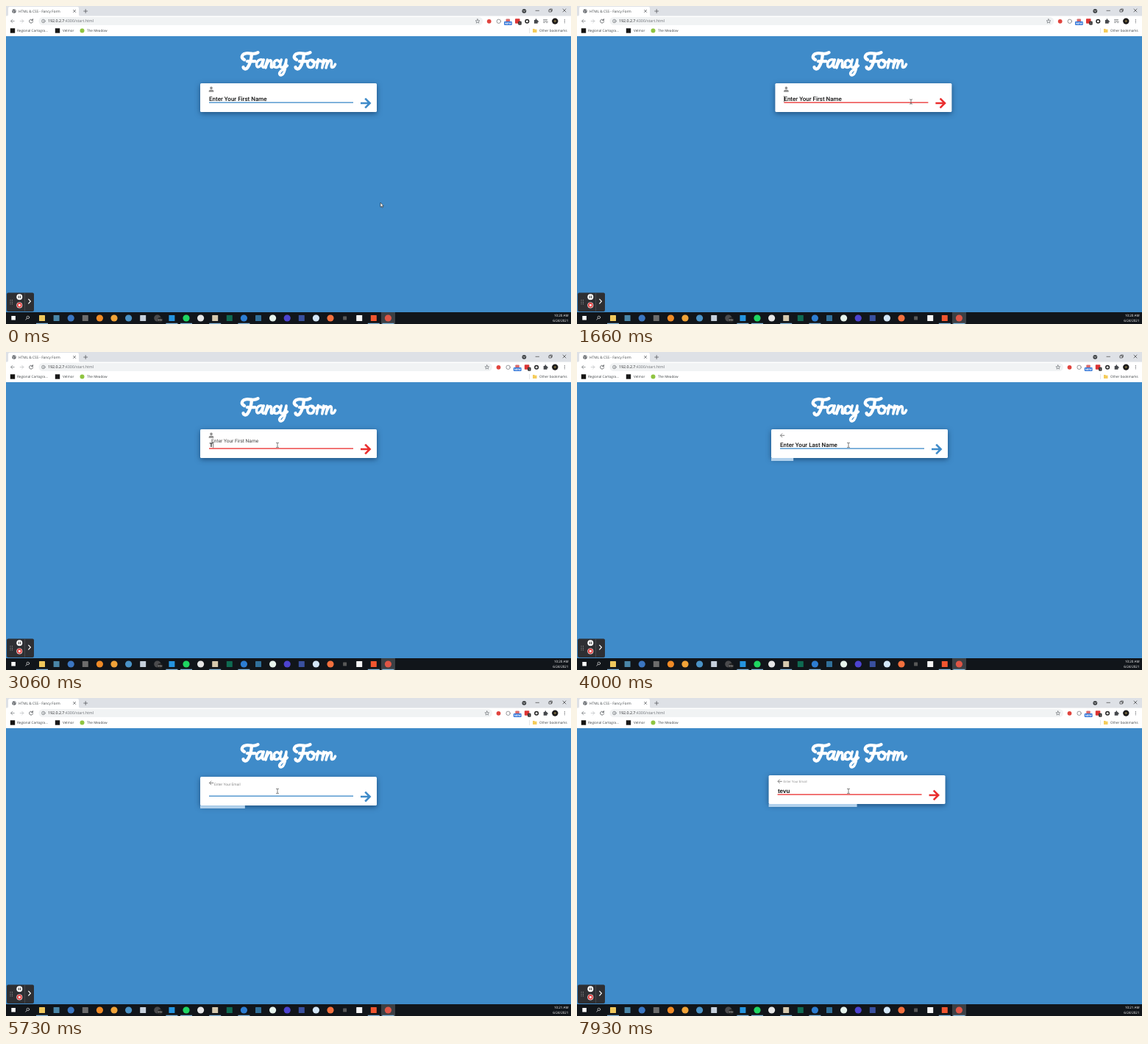
Animation, 768 px wide and 432 px high, one loop 8000 ms. Source, as an HTML page:

```html
<!DOCTYPE html>
<html lang="en">
<head>
<meta charset="utf-8">
<title>Fancy Form</title>
<style>
  html, body { margin: 0; width: 100%; height: 100%; overflow: hidden; background: #3f8bc9; }
  svg { display: block; width: 768px; height: 432px; }
  text { font-family: "Open Sans", sans-serif; text-rendering: geometricPrecision; white-space: pre; }
  #label { font-family: Roboto, sans-serif; }
  #value { font: bold 8px "Liberation Sans", sans-serif; fill: #111; }
  #card { filter: drop-shadow(0 2.4px 3.5px rgba(0, 20, 50, .5)); }
  .line { fill: none; stroke-linecap: round; stroke-linejoin: round; }
  .ui { font-size: 4.6px; fill: #3c4043; }
  .clock { font-size: 4.5px; fill: #fff; text-anchor: end; }
</style>
</head>
<body>
<svg viewBox="0 0 768 432">
  <rect width="768" height="432" fill="#3f8bc9"/>

  <g id="tabs">
    <rect width="768" height="14" fill="#dee1e6"/>
    <path d="M1 14Q3 14 3 11V3Q3 1 5 1H97Q99 1 99 3V11Q99 14 101 14Z" fill="#fff"/>
    <circle cx="11" cy="7" r="2.7" fill="#5f6368"/>
    <path d="M9 6.2L11 7L10.4 8.8M11.8 5L12.8 7" class="line" stroke="#fff" stroke-width=".6"/>
    <text x="17" y="8.7" font-size="4.78" fill="#3c4043">HTML &amp; CSS - Fancy Form</text>
    <path d="M91.5 5.3L94.7 8.5M94.7 5.3L91.5 8.5M105.7 7H110.7M108.2 4.5V9.5" class="line" stroke="#4a4d51" stroke-width=".7"/>
    <circle cx="704.3" cy="6.8" r="2.9" fill="#3c4043"/>
    <path d="M703 6.2L704.3 7.6L705.6 6.2" class="line" stroke="#fff" stroke-width=".7"/>
    <path d="M720 6.3H724.5M738.3 5H741.3V8H738.3ZM739.3 5V4H742.3V7H741.3M757 4L761 8M761 4L757 8" class="line" stroke="#222" stroke-width=".6"/>
  </g>

  <g id="toolbar">
    <rect y="13.5" width="768" height="27.5" fill="#fff"/>
    <path d="M11.2 20.5H6.5M8.8 18.2L6.5 20.5L8.8 22.8" class="line" stroke="#85888c" stroke-width=".8"/>
    <path d="M19.2 20.5H23.9M21.6 18.2L23.9 20.5L21.6 22.8" class="line" stroke="#c2c4c7" stroke-width=".8"/>
    <path d="M36.2 19.2A2.5 2.5 0 1 0 36.6 21.2M36.5 17.6V19.6H34.5" class="line" stroke="#505357" stroke-width=".8"/>
    <rect id="pill" x="44.5" y="15" height="11" rx="5.5" fill="#f1f3f4"/>
    <circle cx="50.8" cy="20.5" r="2.3" class="line" stroke="#5f6368" stroke-width=".6"/>
    <path d="M50.8 20.3V21.7M50.8 19.2V19.3" class="line" stroke="#5f6368" stroke-width=".6"/>
    <text x="57" y="22.4" font-size="5.3" fill="#202124">192.0.2.7<tspan fill="#6a6e73">:4300/start.html</tspan></text>
    <g id="extras">
      <path d="M641 17.8L641.8 19.8L643.9 19.9L642.3 21.2L642.8 23.2L641 22.1L639.2 23.2L639.7 21.2L638.1 19.9L640.2 19.8Z" class="line" stroke="#5f6368" stroke-width=".6"/>
      <circle cx="656.7" cy="20.8" r="2.9" fill="#e0443e"/>
      <circle cx="669.8" cy="20.8" r="2.7" class="line" stroke="#7a7d81" stroke-width=".8"/>
      <rect x="679.5" y="17.5" width="5.5" height="4" rx="1" fill="#d96a6a"/>
      <rect x="677" y="21" width="10.8" height="5" rx="1" fill="#2f74d8"/>
      <text x="682.4" y="25.1" font-size="3.8" font-weight="700" fill="#fff" text-anchor="middle">NEW</text>
      <rect x="692" y="17.3" width="6.5" height="6.5" rx=".8" fill="#dc3434"/>
      <rect x="696.3" y="20.8" width="4.4" height="5" rx="1" fill="#333"/>
      <text x="698.5" y="24.9" font-size="3.8" fill="#fff" text-anchor="middle">1</text>
      <circle cx="708.3" cy="20.8" r="2.3" class="line" stroke="#222" stroke-width="1.5"/>
      <path d="M717.9 19H719.6Q719.3 17.3 720.5 17.3Q721.7 17.3 721.4 19H722.7V20.4Q724 20.2 724 21.2Q724 22.2 722.7 22V23.8H717.9Z" fill="#45484c"/>
    </g>
    <path id="list" d="M730.5 18.5H735.5M730.5 20.5H735.5M730.5 22.5H732.5M734 22L735.2 23L736.2 21.5" class="line" stroke="#5f6368" stroke-width=".7"/>
    <circle cx="746.3" cy="20.6" r="4.2" fill="#1d1b1a"/>
    <circle cx="746.3" cy="20.6" r="1.5" fill="#75663c"/>
    <path d="M759.3 18.5V18.6M759.3 20.6V20.7M759.3 22.7V22.8" class="line" stroke="#45484c" stroke-width="1.1"/>
    <rect x="5.8" y="30.3" width="6.4" height="6.4" fill="#151412"/>
    <text class="ui" x="15" y="35.2">Regional Cartogra...</text>
    <rect x="66.8" y="30.3" width="6.4" height="6.4" fill="#191919"/>
    <text class="ui" x="77" y="35.2">Velmor</text>
    <circle cx="103.5" cy="33.5" r="3" fill="#8fc440"/>
    <text class="ui" x="110" y="35.2">The Meadow</text>
    <path d="M711.5 30V37" stroke="#d4d6d9" stroke-width=".6"/>
    <path d="M716 31H718.3L719 31.8H721.5V36H716Z" fill="#f5cc5b"/>
    <text class="ui" x="725" y="35.2">Other bookmarks</text>
  </g>

  <g id="title" class="line" stroke="#fff" stroke-width="3.5" role="img" aria-label="Fancy Form">
    <g id="capital" stroke-width="4.3">
      <path d="M324 73C318 70 321 64.5 328 64.2C334 64 337 66.5 342.5 63.2"/>
      <path d="M334 65C333.5 72 331.5 79 328.5 83.5C326.5 86.5 323 86 322.5 83"/>
      <path d="M328 75.2H338.5"/>
    </g>
    <use href="#capital" x="71"/>
    <path d="M349 73.5C345 71 340.5 75 340.5 79.5C340.5 85 346 84 349 75"/>
    <path d="M350.3 73C348 79 348 83.6 350 83.6C352 83.6 353.5 80 354.5 76"/>
    <path d="M355.3 73L353 84C354 79 357 73 360 74C362.5 75 358.5 83.5 361.3 83.5C363 83.5 364 81 365 79"/>
    <path d="M371 75.5C370 72 364 73.5 364 79C364 85 369.5 84.5 372.5 80"/>
    <path d="M374.3 73C372 79 372 83.5 375 83.5C378 83.5 380 78 381 73C380.5 82 379.5 89 376.5 92.5C373 96 369.5 92.5 373.5 88.5C376.5 85.5 380 84 382.5 81"/>
    <path d="M415.5 73.3C411 73 409 77 410 80.5C411.3 85 418 84.5 418.7 79C419 75.5 418 73.3 415.5 73.3C416 77 421 77.5 423.5 75"/>
    <path d="M424.3 72.5L422.3 84M423 79.5C424.7 74 427 73 428.6 75.5"/>
    <path d="M431.7 73L429.7 84C430.7 79 433 73 435.7 74C437.7 75 436 80 435 84C436 79 439 73 441.7 74C444 75 440.5 83.5 443.5 83.5C446 83.5 446.8 81 447.6 79"/>
  </g>

  <g id="form">
    <rect id="card" x="264" y="105" width="240" height="39" rx="1.6" fill="#fff"/>
    <rect id="bar" x="264" y="144" height="4" fill="#b1d1ec"/>
    <path id="person" d="M279 109.4A1.8 1.9 0 0 1 279 113.2A1.8 1.9 0 0 1 279 109.4M275.7 116.7V115.6Q275.7 113.7 278 113.7H280Q282.3 113.7 282.3 115.6V116.7Z" fill="#8d8d8d"/>
    <path id="back" d="M282.2 113.3H276.5M279.1 110.6L276.4 113.3L279.1 116" class="line" stroke="#777" stroke-width=".9" style="stroke-linecap:butt"/>
    <text id="value" y="128.6"></text>
    <text id="label"></text>
    <rect id="caret" y="122" width=".6" height="8.4" fill="#222"/>
    <rect id="under" x="276" y="130.5" width="196" height="1.3"/>
    <path id="next" d="M482 132H494.5M488.2 125.6L494.6 132L488.2 138.4" fill="none" stroke-width="2.6"/>
  </g>

  <g id="recorder">
    <rect x="1" y="389.5" width="37" height="25.5" rx="2" fill="#2e2f33"/>
    <path d="M6 399.7V399.8M8.5 399.7V399.8M6 402.2V402.3M8.5 402.2V402.3M6 404.7V404.8M8.5 404.7V404.8" class="line" stroke="#bbb" stroke-width="1.1"/>
    <circle cx="18.3" cy="395.3" r="4" fill="#fff"/>
    <path d="M17.2 393.6V397M19.4 393.6V397" stroke="#333"/>
    <circle cx="18.3" cy="406.4" r="4" fill="#f3e9e9"/>
    <circle cx="18.3" cy="406.4" r="3.3" fill="#e23b3b"/>
    <rect x="16.9" y="405" width="2.8" height="2.8" fill="#fff"/>
    <path d="M25.5 390V414.5" stroke="#55565a" stroke-width=".6"/>
    <path d="M30.7 398.3L33.4 401.2L30.7 404.1" class="line" stroke="#fff" stroke-width="1.2"/>
  </g>

  <rect y="416" width="768" height="16" fill="#11151a"/>
  <g id="tasks"></g>
  <text class="clock" id="clock" x="764.5" y="422"></text>
  <text class="clock" x="764.5" y="429.3">6/24/2021</text>

  <path id="arrow" d="M0 0V6.2L1.4 5L2.3 7L3.3 6.6L2.4 4.6H4.2Z" fill="#fff" stroke="#222" stroke-width=".6"/>
  <path id="beam" d="M-1.5 -3.2Q0 -3.2 0 -2.5Q0 -3.2 1.5 -3.2M0 -2.5V2.5M-1.5 3.2Q0 3.2 0 2.5Q0 3.2 1.5 3.2" class="line" stroke="#444" stroke-width=".7"/>
</svg>

<script>
const LOOP = 8000, BLUE = '#3f8bc9', RED = '#ea2e2e';
const CUT = 2400, FOCUS = 1360, MINUTE = 5200;
const SHAKES = [1233, 7594], STEP = 100;

const questions = [
  { at: 0, label: 'Enter Your First Name', value: 'Tevu', keys: [2974, 3090, 3200, 3300] },
  { at: 3700, label: 'Enter Your Last Name', value: 'Veltrin', keys: [4400, 4530, 4660, 4790, 4920, 5260, 5430] },
  { at: 5680, label: 'Enter Your Email', value: 'tevu', keys: [7040, 7130, 7220, 7310] }
];
// time, x, y
const mousePath = [[0, 509, 267], [60, 509, 267], [950, 490, 131], [1300, 489, 131], [1660, 454, 130], [2400, 369, 126.5]];

const $ = id => document.getElementById(id);
const set = (id, attrs) => { for (const k in attrs) $(id).setAttribute(k, attrs[k]); };
const show = (id, on) => set(id, { visibility: on ? 'visible' : 'hidden' });
const mix = (a, b, k) => a + (b - a) * k;

// cubic-bezier(.42, 0, .58, 1)
function ease(p) {
  if (p <= 0) return 0;
  if (p >= 1) return 1;
  let lo = 0, hi = 1;
  for (let i = 0; i < 20; i++) {
    const u = (lo + hi) / 2, v = 1 - u;
    if (3 * v * v * u * .42 + 3 * v * u * u * .58 + u * u * u < p) lo = u; else hi = u;
  }
  return lo * lo * (3 - 2 * lo);
}
const ramp = (t, from, ms) => ease((t - from) / ms);

function shake(t) {
  let x = 0;
  for (const start of SHAKES)
    for (let i = 0; i <= 6; i++) {
      const target = i < 6 ? (i % 2 * 2 - 1) * 8 : 0;
      x = mix(x, target, ramp(t, start + i * STEP, STEP));
    }
  return x;
}

function mouse(t) {
  let i = 1;
  while (i < mousePath.length - 1 && t > mousePath[i][0]) i++;
  const [t0, x0, y0] = mousePath[i - 1], [t1, x1, y1] = mousePath[i];
  const k = ramp(t, t0, t1 - t0);
  return [mix(x0, x1, k), mix(y0, y1, k)];
}

function buildTasks() {
  const icons = ('s#efc75c s#4a86a8 c#3b76c2 s#6c6c6c c#ef8a26 c#f0a338 c#4a92c6 s#c6d0dc c#4b4b4d s#2594df c#1fd662 c#e6e6e6 ' +
    's#d6c9ae s#0f6b52 c#2d7dd2 s#31709a c#e6f3ec c#4d43d0 s#39509f c#d3e6f7 c#f2703e s#585858 s#f4f4f4 s#f0552f c#de5546').split(' ');
  const open = [0, 9, 10, 12, 14, 23, 24];
  let out = '<rect x="7.3" y="421" width="5.6" height="5.6" fill="#fff"/>' +
    '<circle cx="29.8" cy="423" r="1.8" class="line" stroke="#ddd" stroke-width=".7"/>' +
    '<path d="M28.4 424.4L26.8 426.2" class="line" stroke="#ddd" stroke-width=".8"/>' +
    '<rect x="510" y="416" width="19" height="16" fill="#3c4045"/>';
  icons.forEach((icon, i) => {
    const x = 49 + i * 19.6, fill = icon.slice(1);
    const r = i === 21 ? 2.5 : 4;
    out += icon[0] === 'c'
      ? `<circle cx="${x}" cy="424" r="4.6" fill="${fill}"/>`
      : `<rect x="${x - r}" y="${424 - r}" width="${2 * r}" height="${2 * r}" rx=".6" fill="${fill}"/>`;
    if (open.includes(i)) out += `<rect x="${x - 8}" y="430.8" width="16" height="1.2" fill="#86b8dd"/>`;
  });
  out += '<circle cx="209.5" cy="426.6" r="3.6" fill="#222"/>' +
    '<text x="209.5" y="428.2" font-size="3.8" fill="#fff" text-anchor="middle">99+</text>';
  $('tasks').innerHTML = out;
}

function draw(t) {
  const n = questions.filter(q => t >= q.at).length - 1;
  const q = questions[n];
  const typed = q.value.slice(0, q.keys.filter(k => t >= k).length);
  const failed = SHAKES.some(s => t >= s && s >= q.at);

  let drop = 0, progress = 0, small = 0;
  questions.forEach((item, i) => {
    if (i) {
      drop += 4 * (ramp(t, item.at, STEP) - ramp(t, item.at + STEP, STEP));
      progress += 60 * ramp(t, item.at, 600);
      small -= ramp(t, item.at, 200);
    }
    small += ramp(t, item.keys[0], 200);
  });

  set('form', { transform: `translate(${shake(t)} ${drop})` });
  set('bar', { width: progress });
  show('person', n === 0);
  show('back', n > 0);

  const grey = Math.round(mix(17, 150, small));
  $('label').textContent = q.label;
  set('label', {
    x: 276 + 8 * small, y: 128.9 - 14.3 * small,
    'font-size': 8 - 3.6 * small,
    'font-weight': small < .3 ? 500 : 400,
    fill: `rgb(${grey},${grey},${grey})`
  });
  $('value').textContent = typed;
  set('value', { x: 276.4 });
  set('under', { fill: failed ? RED : BLUE });
  set('next', { stroke: failed ? RED : BLUE });

  const blink = Math.floor((t - FOCUS) / 500) % 2 === 0;
  show('caret', n === 0 && t >= FOCUS && (typed ? true : blink));
  set('caret', { x: 276 + (typed ? $('value').getComputedTextLength() + .6 : 0) });

  const moved = t >= CUT;
  set('extras', { transform: `translate(${moved ? 12.8 : 0} 0)` });
  set('pill', { width: moved ? 616.5 : 603.7 });
  show('list', !moved);
  $('clock').textContent = t < MINUTE ? '10:20 AM' : '10:21 AM';

  const [x, y] = mouse(t);
  const inField = x < 474 && y < 133;
  for (const id of ['arrow', 'beam']) set(id, { transform: `translate(${x} ${y})` });
  show('arrow', !inField);
  show('beam', inField);
}

buildTasks();
const began = performance.now();
function tick() {
  draw((performance.now() - began) % LOOP);
  requestAnimationFrame(tick);
}
tick();
</script>
</body>
</html>
```
